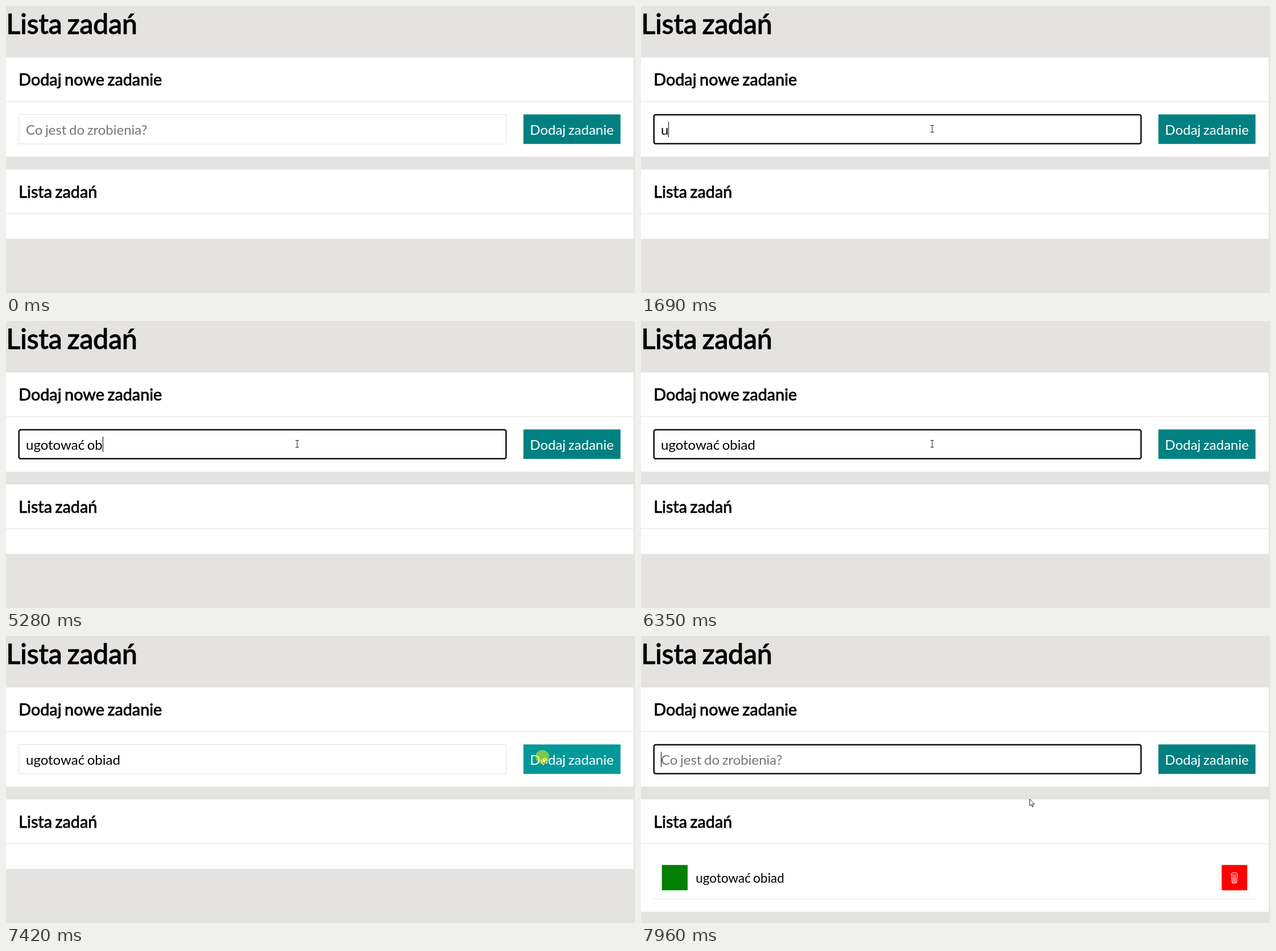
These frames come from a looping animation (1106 px wide and 506 px high, 8000 ms). An HTML page with a canvas:

```html
<!DOCTYPE html>
<html lang="pl">
<head>
<meta charset="utf-8">
<title>Lista zadań</title>
<style>
  html, body { margin: 0; width: 100%; height: 100%; overflow: hidden; background: #e4e3e1; }
  canvas { display: block; }
</style>
</head>
<body>
<canvas id="stage" width="1106" height="506"></canvas>
<script>
const ctx = document.getElementById('stage').getContext('2d');
const LOOP = 8000;
const FRAME = 1000 / 15;   // the pointer is redrawn 15 times a second
const BLINK = 535;         // half a caret blink
const ENTER = 60, FOCUS = 690, PRESS = 7350, ADDED = 7550;

// Each burst of typing spreads its letters evenly from start to end
const bursts = [
  { letters: 'ugo', start: 1690, end: 2220 },
  { letters: 'towa', start: 2750, end: 3340 },
  { letters: 'ć', start: 4090, end: 4090 },
  { letters: ' o', start: 4550, end: 4750 },
  { letters: 'biad', start: 5280, end: 5810 }
];
const TASK = bursts.map(b => b.letters).join('');
const keyTimes = bursts.flatMap(({ letters, start, end }) =>
  [...letters].map((_, i) => start + (end - start) * i / Math.max(1, letters.length - 1)));

// The pointer eases from place to place and rests in between
const entry = { x: 1004, y: 494 };
const moves = [
  { start: 60, end: 340, x: 950, y: 230 },
  { start: 340, end: 600, x: 509.5, y: 216 },
  { start: 860, end: 1340, x: 512, y: 216.5 },
  { start: 6743, end: 7165, x: 943, y: 213 },
  { start: 7745, end: 7930, x: 683.5, y: 287.5 }
];

function pointerAt(t) {
  const time = Math.floor(t / FRAME) * FRAME;
  let { x, y } = entry;
  for (const move of moves) {
    const k = Math.min(1, Math.max(0, (time - move.start) / (move.end - move.start)));
    const eased = k * k * (3 - 2 * k);
    x += (move.x - x) * eased;
    y += (move.y - y) * eased;
  }
  return { x, y };
}

function box(x, y, w, h, color) {
  ctx.fillStyle = color;
  ctx.fillRect(x, y, w, h);
}

function text(str, x, y, size, color = '#000') {
  ctx.font = `${size}px Lato, sans-serif`;
  ctx.wordSpacing = `${-0.065 * size}px`;
  ctx.fillStyle = color;
  ctx.fillText(str, x, y);
}

// Regular weight thickened by an outline, like a browser's synthetic bold
function heading(str, x, y, size) {
  text(str, x, y, size);
  ctx.strokeStyle = '#000';
  ctx.lineWidth = size / 36;
  ctx.strokeText(str, x, y);
}

function card(y, height, title) {
  box(0, y, 1103.6, height, '#fff');
  box(0, y + 77.4, 1103.6, 1, '#e4e4e4');
  heading(title, 22.2, y + 49.5, 28.8);
}

function drawInput(value, focused, caret) {
  ctx.beginPath();
  if (focused) {
    ctx.roundRect(22.75, 191.75, 856.5, 51, 3);
    ctx.strokeStyle = '#101010';
    ctx.lineWidth = 2.5;
  } else {
    ctx.rect(22.5, 191.5, 857, 51.5);
    ctx.strokeStyle = '#e2e2e2';
    ctx.lineWidth = 1;
  }
  ctx.stroke();
  text(value || 'Co jest do zrobienia?', 35, 226.6, 24, value ? '#000' : '#757575');
  if (caret) box(Math.round(35 + ctx.measureText(value).width), 204, 1, 27, '#000');
}

function drawTrash(x, y) {
  ctx.strokeStyle = '#fff';
  ctx.lineWidth = 1;
  ctx.beginPath();
  ctx.ellipse(x, y - 7.5, 5.7, 2, 0, 0, 7);
  ctx.moveTo(x - 5.3, y - 6);
  ctx.lineTo(x - 4, y + 8);
  ctx.quadraticCurveTo(x, y + 10.5, x + 4, y + 8);
  ctx.lineTo(x + 5.3, y - 6);
  for (let slot = -1; slot <= 1; slot++) {
    ctx.moveTo(x + slot * 2.3, y - 4);
    ctx.lineTo(x + slot * 2.3, y + 8);
  }
  ctx.stroke();
}

function drawTask() {
  box(36.7, 403.7, 45.3, 44.6, '#008000');
  text(TASK, 96.3, 434.5, 22.5);
  box(1021, 403.7, 45, 44.6, '#f00');
  drawTrash(1043.3, 427);
  box(22, 463, 1059, 1, '#e8e8e8');
}

function drawIBeam(x, y) {
  ctx.strokeStyle = '#222';
  ctx.lineWidth = 1;
  ctx.stroke(new Path2D(`M${x - 3} ${y - 6}h6m-3 0v12m-3 0h6`));
}

function drawArrow(x, y) {
  const arrow = new Path2D(`M${x} ${y}v12l2.7-2.6l2 4.6l1.8-.8l-1.9-4.4h3.7z`);
  ctx.fillStyle = '#fff';
  ctx.fill(arrow);
  ctx.strokeStyle = '#111';
  ctx.lineWidth = 0.9;
  ctx.stroke(arrow);
}

function drawPointer({ x, y }, clicking) {
  const overInput = x < 900 && y > 190 && y < 244;
  (overInput ? drawIBeam : drawArrow)(x, y);
  if (!clicking) return;
  ctx.fillStyle = 'rgba(255, 255, 0, 0.48)';
  ctx.beginPath();
  ctx.arc(x, y, 12, 0, 7);
  ctx.fill();
}

function render(t) {
  const added = t >= ADDED;
  const focused = added || (t >= FOCUS && t < PRESS);
  const typed = keyTimes.filter(k => k <= t);
  const value = added ? '' : TASK.slice(0, typed.length);
  // Every edit restarts the caret's blinking
  const lastEdit = added ? ADDED : typed.at(-1) ?? FOCUS;
  const caret = focused && Math.floor((t - lastEdit) / BLINK) % 2 === 0;
  const clicking = Math.abs(t - FOCUS) < 70 || (t >= PRESS && !added);
  const pointer = pointerAt(t);
  const hover = pointer.x > 910 && pointer.x < 1081 && pointer.y > 191 && pointer.y < 243;

  box(0, 0, 1106, 506, '#e4e3e1');
  heading('Lista zadań', 0.6, 49.2, 48);
  card(90.7, 174.8, 'Dodaj nowe zadanie');
  card(288.1, added ? 198.2 : 122.6, 'Lista zadań');
  drawInput(value, focused, caret);
  box(909.8, 191.2, 170.7, 52, hover ? '#099' : '#008080');
  text('Dodaj zadanie', 921.3, 226.6, 24, '#fff');
  if (added) drawTask();
  if (t >= ENTER) drawPointer(pointer, clicking);
}

function tick() {
  render(performance.now() % LOOP);
  requestAnimationFrame(tick);
}
tick();
</script>
</body>
</html>
```
